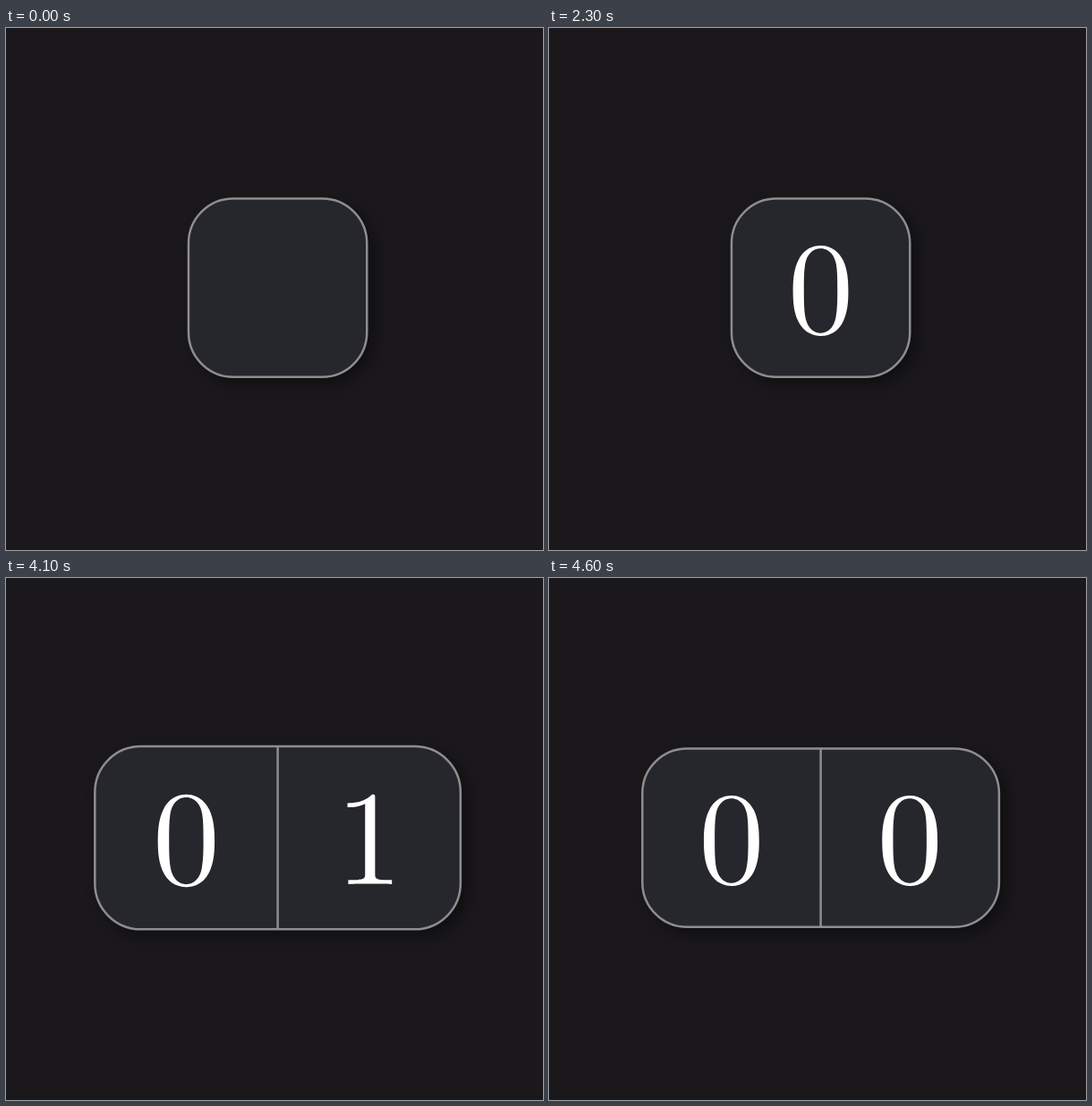
Animation, 600 px wide and 583 px high, one loop 4.8 s. Source, as an HTML page with a canvas:

```html
<!DOCTYPE html>
<html lang="en">
<head>
<meta charset="utf-8">
<title>Binary cells</title>
<style>
  html, body { margin: 0; width: 100%; height: 100%; overflow: hidden; background: #1a181b; }
  canvas { display: block; }
</style>
</head>
<body>
<canvas id="stage" width="600" height="583"></canvas>
<script>
const ctx = document.getElementById('stage').getContext('2d');

const LOOP = 4800, STEP = 100;
const CX = 303.6, CY = 290.2, CELL = 199.3, RADIUS = 50;
const UNIT = 0.1468;      // pixels per glyph unit
const BASELINE = 50.5;    // below the cell centre

// Roman digits on a 1000-unit em, y pointing up
const GLYPHS = {
  0: new Path2D('M460 320C460 400 455 480 420 554C374 650 292 666 250 666C190 666 117 640 76 547C44 478 39 400 39 320C39 245 43 155 84 79C127-2 200-22 249-22C303-22 379-1 423 94C455 163 460 241 460 320ZM377 332C377 257 377 189 366 125C351 30 294 0 249 0C210 0 151 25 133 121C122 181 122 273 122 332C122 396 122 462 130 516C149 635 224 644 249 644C282 644 348 626 367 527C377 471 377 395 377 332Z'),
  1: new Path2D('M294 640C294 664 294 666 271 666C209 602 121 602 89 602V571C109 571 168 571 220 597V79C220 43 217 31 127 31H95V0C130 3 217 3 257 3C297 3 384 3 419 0V31H387C297 31 294 42 294 79Z')
};

// Scale of the card at each step of a pulse
const APPEAR = [1.0175, 1.1, 1.035, 0.97, 0.99, 1];
const PULSE = [1.025, 1.065, 1.04, 1.015, 1.004, 1];

function pulse(curve, start, t) {
  const i = Math.floor((t - start) / STEP);
  return i < 0 ? 1 : curve[Math.min(i, curve.length - 1)];
}

function stateAt(t) {
  if (t < 1800) return { digits: [''], scale: 1, grow: 1 };
  if (t < 2600) {
    return { digits: [0], scale: pulse(APPEAR, 1800, t), grow: t < 1900 ? 0.642 : 1 };
  }
  if (t < 4100) {
    return { digits: [t < 2800 ? 0 : 1], scale: pulse(PULSE, 2600, t), grow: 1 };
  }
  return { digits: [0, t < 4300 ? 1 : 0], scale: pulse(PULSE, 4100, t), grow: 1 };
}

function drawCard(count, scale) {
  const w = CELL * count * scale, h = CELL * scale;
  const x = CX - w / 2, y = CY - h / 2;
  ctx.beginPath();
  ctx.roundRect(x, y, w, h, RADIUS * scale);

  ctx.save();
  ctx.shadowColor = 'rgba(0, 0, 0, 0.45)';
  ctx.shadowBlur = 18;
  ctx.shadowOffsetX = ctx.shadowOffsetY = 7;
  ctx.fillStyle = '#25272c';
  ctx.fill();
  ctx.restore();

  for (let i = 1; i < count; i++) {
    ctx.moveTo(x + i * h, y);
    ctx.lineTo(x + i * h, y + h);
  }
  ctx.strokeStyle = '#8e8d90';
  ctx.lineWidth = 2.5;
  ctx.stroke();
}

function drawDigit(digit, x, scale, grow) {
  const mid = 322;   // vertical middle of the glyph
  ctx.save();
  ctx.translate(x, CY + (BASELINE - mid * UNIT) * scale);
  ctx.scale(UNIT * scale * grow, -UNIT * scale * grow);
  ctx.translate(-250, -mid);
  ctx.fillStyle = '#fff';
  ctx.fill(GLYPHS[digit], 'evenodd');
  ctx.restore();
}

function draw(t) {
  const { digits, scale, grow } = stateAt(t);
  ctx.fillStyle = '#1a181b';
  ctx.fillRect(0, 0, 600, 583);
  drawCard(digits.length, scale);
  digits.forEach((d, i) => {
    if (d === '') return;
    const x = CX + (i - (digits.length - 1) / 2) * CELL * scale;
    drawDigit(d, x, scale, grow);
  });
}

const start = performance.now();
function tick() {
  draw((performance.now() - start) % LOOP);
  requestAnimationFrame(tick);
}
tick();
</script>
</body>
</html>
```
